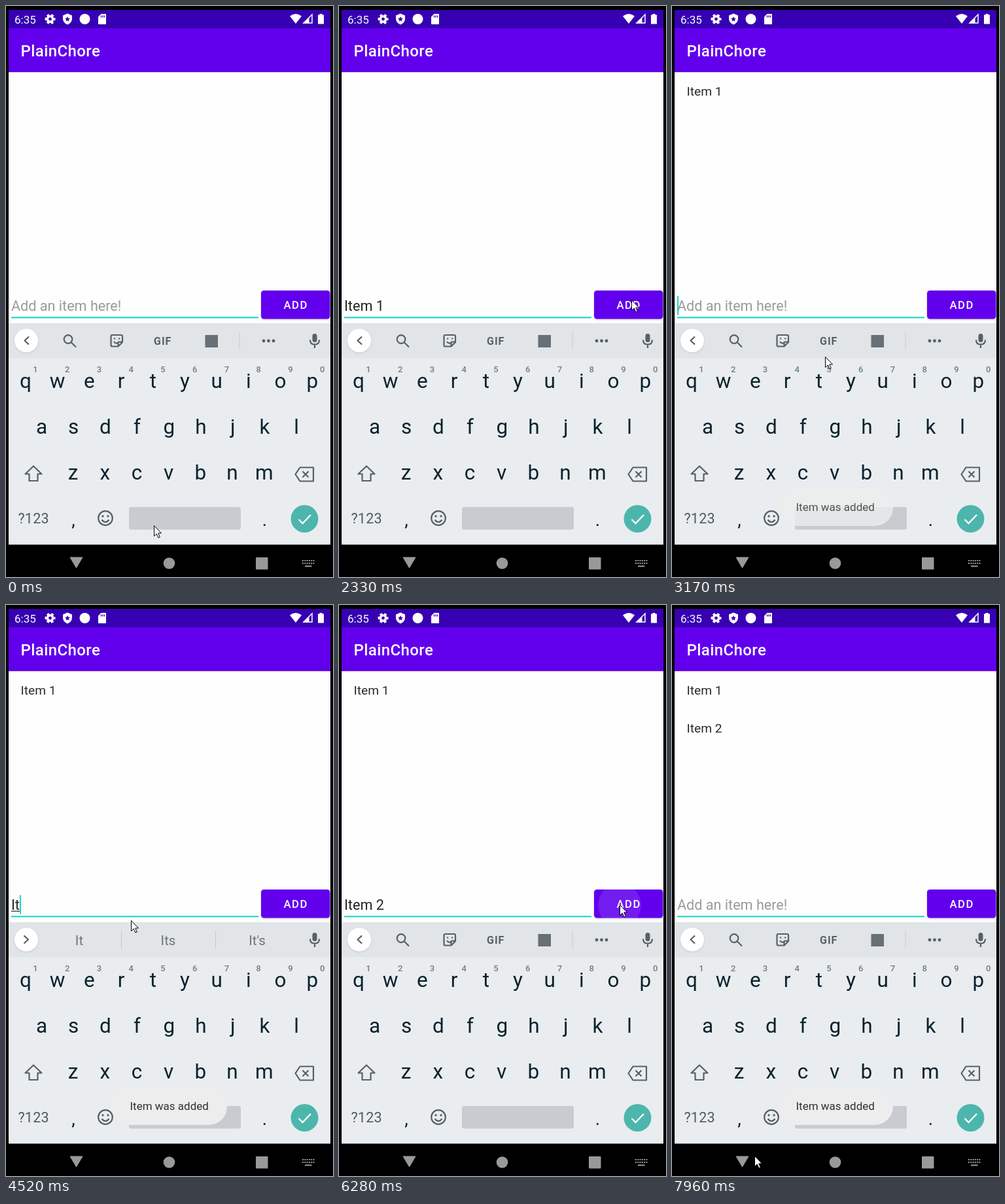
An HTML page for the animation above (8000 ms loop, 500 by 873 pixels).

```html
<!DOCTYPE html>
<html lang="en">
<head>
<meta charset="utf-8">
<title>Todo list</title>
<style>
html, body { margin: 0; width: 100%; height: 100%; overflow: hidden; background: #000; }
svg { display: block; width: 100%; height: 100%; font-family: Roboto, sans-serif; }
text { white-space: pre; }
.line { fill: none; stroke: #566066; stroke-width: 2.2; stroke-linejoin: round; }
.mid { text-anchor: middle; }
</style>
</head>
<body>
<svg viewBox="0 0 500 873">
  <defs>
    <clipPath id="buttonClip"><rect x="390" y="435" width="105.5" height="43.5" rx="4.5"/></clipPath>
    <filter id="soft" x="-30%" y="-30%" width="160%" height="160%"><feGaussianBlur stdDeviation="1.5"/></filter>
  </defs>
  <rect width="500" height="873"/>
  <rect x="4" y="34" width="492" height="790" fill="#fefefe"/>
  <rect x="4" y="6" width="492" height="28.500" fill="#3700b3"/>
  <rect x="4" y="34" width="492" height="67" fill="#6200ee"/>
  <rect x="4" y="101" width="492" height="1" fill="#dcd8e2"/>

  <!-- status bar -->
  <g fill="#fff">
    <text x="13" y="26.500" font-size="17">6:35</text>
    <g fill="none" stroke="#fff">
      <circle cx="67.500" cy="20" r="4.200" stroke-width="3.600"/>
      <circle cx="67.500" cy="20" r="6.700" stroke-width="2.600" stroke-dasharray="4 3.016" stroke-dashoffset="2"/>
    </g>
    <path d="M94 11.500L101 14.500V19.500Q101 25.500 94 28.500Q87 25.500 87 19.500V14.500Z"/>
    <path d="M94 16l1.200 2.600 2.800.3-2.100 1.900.6 2.800-2.500-1.400-2.500 1.400.6-2.800-2.100-1.900 2.800-.3Z" fill="#3700b3"/>
    <circle cx="120.500" cy="20" r="8"/>
    <path d="M145.500 12H152Q153 12 153 13V27Q153 28 152 28H142Q141 28 141 27V16.500Z"/>
    <path d="M145.500 14.500v3M148 14.500v3M150.500 14.500v3" stroke="#3700b3" stroke-width="1.300"/>
    <path d="M434 15.500Q443 8.500 452 15.500L443 27Z"/>
    <path d="M468 13V26H455Z" fill="none" stroke="#fff" stroke-width="1.500"/>
    <path d="M463.500 18V26.500H454.500Z"/>
    <path d="M479.500 12h4v1.500h2.500V27.500h-9V13.500h2.500Z"/>
    <text x="22.500" y="77" font-size="24" font-weight="500" letter-spacing=".4">PlainChore</text>
  </g>

  <!-- list and entry -->
  <g font-size="19.200" fill="#2b2b2b">
    <text id="item1" x="22.500" y="137">Item 1</text>
    <text id="item2" x="22.500" y="194.500">Item 2</text>
  </g>
  <text id="entry" x="8" y="466" font-size="21.600"></text>
  <rect id="under" x="8" y="467.500" height="1.300" fill="#333"/>
  <rect id="caret" y="443.500" width="2" height="29" fill="#19d3c5"/>
  <rect x="8" y="475.300" width="378" height="2" fill="#12d3c4"/>
  <rect x="390" y="436" width="105.500" height="44" rx="4.500" fill="#aaa" opacity=".5" filter="url(#soft)"/>
  <rect x="390" y="435" width="105.500" height="43.500" rx="4.500" fill="#6200ee"/>
  <circle id="ripple" fill="#fff" clip-path="url(#buttonClip)"/>
  <text x="424.500" y="463" font-size="16.700" font-weight="500" letter-spacing="1.500" fill="#fff">ADD</text>

  <!-- keyboard -->
  <rect x="4" y="485" width="492" height="54" fill="#e1e5e8"/>
  <rect x="4" y="538.500" width="492" height="285" fill="#e9edf0"/>
  <circle cx="31" cy="512.500" r="18" fill="#aab" opacity=".5" filter="url(#soft)"/>
  <circle cx="31" cy="511.500" r="18" fill="#fff"/>
  <path id="chevron" class="line"/>
  <g id="tools">
    <circle class="line" cx="95" cy="509.500" r="6.300"/>
    <path class="line" d="M99.500 514L107 521.500" stroke-width="2.600"/>
    <path class="line" d="M162.500 503h13.500q2 0 2 2v9l-6.500 6.500h-9q-2 0-2-2v-13.500q0-2 2-2ZM178 513.500h-4.500q-2 0-2 2v5M165 513q3 4.500 7 1" stroke-width="1.800"/>
    <path d="M165 508.500h2.200M172 508.500h2.200" stroke="#566066" stroke-width="2.200"/>
    <text x="226" y="517.500" font-size="16" font-weight="700" letter-spacing="1" fill="#566066">GIF</text>
    <rect x="304.500" y="503" width="19.500" height="19" fill="#667076"/>
    <rect x="356.500" y="498" width="1" height="27" fill="#c9cdd1"/>
    <g fill="#566066"><circle cx="394" cy="512" r="2.400"/><circle cx="401.500" cy="512" r="2.400"/><circle cx="409" cy="512" r="2.400"/></g>
  </g>
  <g id="words" class="mid" font-size="20.500" fill="#6d7579">
    <text x="112" y="520"></text><text x="248" y="520"></text><text x="384" y="520"></text>
    <path d="M176.500 498v27.500M320.500 498v27.500" stroke="#c3c8cc"/>
  </g>
  <rect x="468.500" y="501" width="7" height="13" rx="3.500" fill="#566066"/>
  <path class="line" d="M465 510.500q0 7 7 7t7-7M472 517.500V523" stroke-width="1.900"/>
  <g id="keys" class="mid" fill="#0b222d"></g>
  <path class="line" d="M42 703.500L54.500 715.500H48.500V726H35.500V715.500H29.500Z"/>
  <path class="line" d="M449.500 705.500H470V726.500H449.500L442.500 716ZM453.500 711.500l9 9M462.500 711.500l-9 9"/>
  <text x="18.500" y="791" font-size="21.500" fill="#505b61" letter-spacing=".2">?123</text>
  <circle class="line" cx="152" cy="783" r="10.800"/>
  <path class="line" d="M146.500 785.500q5.500 7 11 0"/>
  <g fill="#566066"><circle cx="148" cy="780" r="1.700"/><circle cx="156" cy="780" r="1.700"/></g>
  <rect x="188" y="766" width="171" height="34.500" rx="3" fill="#c8ccd0"/>
  <circle cx="456.500" cy="784" r="21" fill="#4db6ac"/>
  <path d="M447.500 785l6 6 12.500-13" fill="none" stroke="#fff" stroke-width="2.300"/>

  <g id="toast">
    <rect x="162" y="738" width="176" height="57" rx="28" fill="#ededed"/>
    <text x="189.500" y="772" font-size="17" fill="#303030">Item was added</text>
  </g>

  <!-- navigation bar -->
  <rect x="4" y="823.500" width="492" height="49.500"/>
  <g fill="#999">
    <path d="M98 843h19l-9.500 16Z" stroke="#999" stroke-linejoin="round"/>
    <circle cx="249.500" cy="852" r="8.800"/>
    <rect x="382" y="843" width="18.500" height="18.500" rx="1"/>
    <path d="M453 848h18.500M453 852h18.500" stroke="#999" stroke-width="2" stroke-dasharray="2 1.300"/>
    <path d="M457 856.500h10.500" stroke="#999" stroke-width="2"/>
  </g>
  <path id="pointer" d="M.5.500V16.500L4.300 13L6.900 19L9.300 18L6.800 12H11.500Z" fill="#fff" stroke="#000" stroke-width="1"/>
</svg>
<script>
const LOOP = 8000, BLINK = 500;
const $ = id => document.getElementById(id);
const clamp = v => Math.max(0, Math.min(1, v));
const show = (el, on) => el.setAttribute('visibility', on ? 'visible' : 'hidden');
const set = (el, attrs) => { for (const k in attrs) el.setAttribute(k, attrs[k]); };

// time, entered text
const typing = [
  [-BLINK, ''], [560, 'I'], [710, 'It'], [860, 'Ite'], [1010, 'Item'], [1410, 'Item '], [1810, 'Item 1'],
  [2810, ''], [4240, 'I'], [4520, 'It'], [4800, 'Ite'], [4940, 'Item'], [5070, 'Item '], [5340, 'Item 2'],
  [6430, '']
];
const hints = {
  'I': ['I', "I'm", 'It'], 'It': ['It', 'Its', "It's"], 'Ite': ['Ite', 'It', "It's"],
  'Item': ['Item', 'Items', 'Itemized'], 'Item ': ['is', 'and', 'in']
};
// time, x, y of the mouse pointer
const moves = [
  [0, 226, 794], [2210, 325, 650], [2330, 447, 449], [2930, 405, 472], [3050, 315, 517], [3170, 234, 536],
  [3290, 202, 503], [3410, 191, 482], [5740, 205, 480], [5890, 300, 468], [6010, 385, 461], [6160, 429, 458],
  [6640, 405, 400], [6790, 351, 300], [6940, 325, 287], [7060, 292, 340], [7180, 252, 440],
  [7300, 212, 560], [7420, 178, 680], [7540, 150, 775], [7660, 132, 825], [7800, 126, 842]
];
const presses = [[2450, 447, 457], [6160, 429, 459]];
const added = [2810, 6430];

const latest = (list, t) => list.filter(e => e[0] <= t).pop();

function buildKeys() {
  const key = (s, x, y, size, extra = '') =>
    `<text x="${x}" y="${y}" font-size="${size}" ${extra}>${s}</text>`;
  const row = (s, x, y) => [...s].map((c, i) => key(c, x + i * 48.7, y, 31.5)).join('');
  const digits = [...'1234567890'].map((d, i) =>
    key(d, 45 + i * 48.75, 560, 13, 'fill="#737c81" font-weight="500"')).join('');
  $('keys').innerHTML = row('qwertyuiop', 30, 583.5) + digits + row('asdfghjkl', 54.5, 653.5) +
    row('zxcvbnm', 102.5, 724) + key(',', 103, 795, 28) + key('.', 395.5, 795, 28);
}

function drawEntry(t) {
  const [since, text] = latest(typing, t);
  const entry = $('entry');
  entry.textContent = text || 'Add an item here!';
  entry.setAttribute('fill', text ? '#252525' : '#9b9b9b');
  const width = text ? entry.getComputedTextLength() : 0;
  const composing = text && !text.includes(' ');
  show($('under'), composing);
  $('under').setAttribute('width', width);
  $('caret').setAttribute('x', 8 + width);
  show($('caret'), t >= 560 && Math.floor((t - since) / BLINK) % 2 === 0);

  const words = hints[text];
  const waiting = text.length === 6 && t - since < (text === 'Item 1' ? 120 : 150);
  const tools = !words && !waiting;
  show($('words'), words);
  show($('tools'), tools);
  if (words) $('words').querySelectorAll('text').forEach((el, i) => el.textContent = words[i]);
  $('chevron').setAttribute('d', tools ? 'M35 505.5l-6.500 6 6.500 6' : 'M27.500 505.500l6.500 6-6.500 6');
}

function drawRipple(t) {
  const press = latest(presses, t);
  const age = press ? t - press[0] : LOOP;
  set($('ripple'), {
    cx: press ? press[1] : 0, cy: press ? press[2] : 0,
    r: 18 + 90 * clamp(age / 400) ** 1.5,
    opacity: 0.11 * clamp((500 - age) / 200)
  });
}

function draw(t) {
  drawEntry(t);
  drawRipple(t);
  show($('item1'), t >= added[0]);
  show($('item2'), t >= added[1]);
  const start = (t < added[1] ? added[0] : added[1]) + 120;
  const age = t - start;
  $('toast').setAttribute('opacity', clamp(age / 300) * clamp((2300 - age) / 300));
  const [, x, y] = latest(moves, t);
  $('pointer').setAttribute('transform', `translate(${x} ${y})`);
}

buildKeys();
const began = performance.now();
function tick() {
  draw((performance.now() - began) % LOOP);
  requestAnimationFrame(tick);
}
tick();
</script>
</body>
</html>
```
